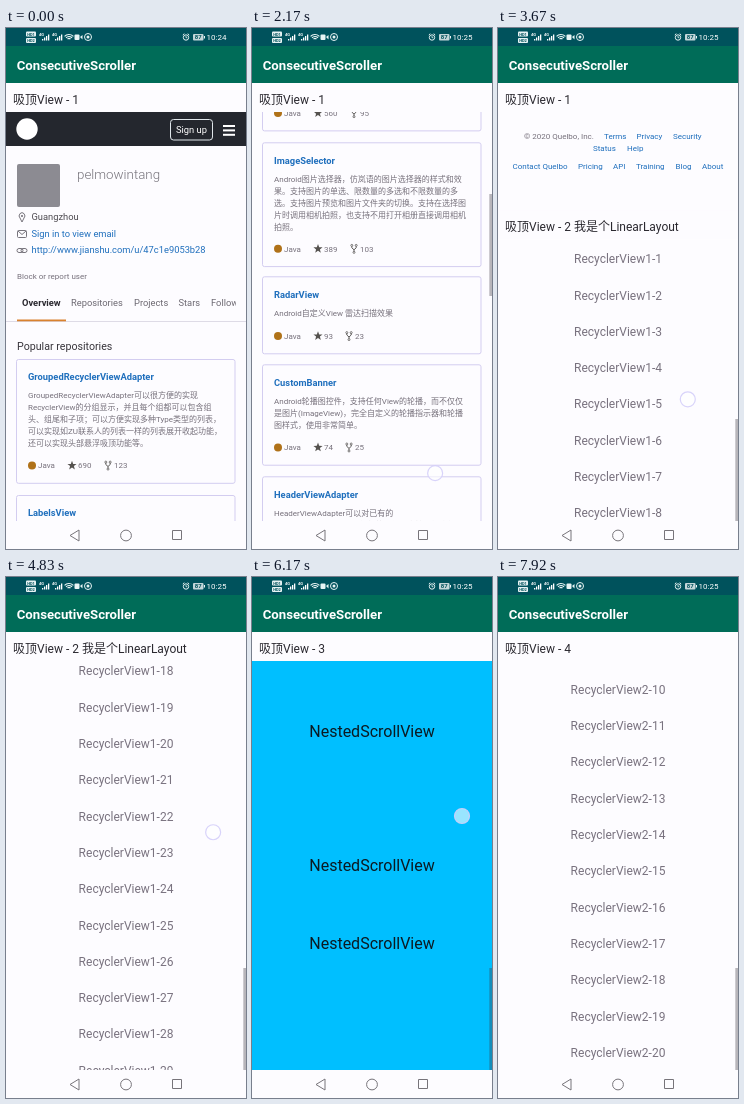
Recreate the animation shown at these times as an HTML page with a canvas. Size 240 px wide and 521 px high, loop 8 s.

```html
<!DOCTYPE html>
<html lang="zh">
<head>
<meta charset="utf-8">
<title>ConsecutiveScroller</title>
<style>
html, body { margin: 0; width: 100%; height: 100%; overflow: hidden; background: #fdfcff; }
canvas { display: block; width: 240px; height: 521px; }
</style>
</head>
<body>
<canvas id="stage"></canvas>
<script>
const W = 240, H = 521, LOOP = 8000, TOP = 55, BOTTOM = 493, BAR = 29, ROW = 36.3;
const PAPER = '#fdfcff', LINK = '#1f6fbd', GREY = '#77717c', INK = '#2b2930';
const canvas = document.getElementById('stage');
const ctx = canvas.getContext('2d');
const dpr = window.devicePixelRatio || 1;
canvas.width = W * dpr;
canvas.height = H * dpr;

// Page layout, in scroll coordinates
const heads = [
  { y: 55, label: '吸顶View - 1' },
  { y: 1743, label: '吸顶View - 2 我是个LinearLayout' },
  { y: 2861, label: '吸顶View - 3' },
  { y: 3377, label: '吸顶View - 4' }
];

const cards = [
  { y: 331, name: 'GroupedRecyclerViewAdapter', stars: 690, forks: 123, text: [
    'GroupedRecyclerViewAdapter可以很方便的实现',
    'RecyclerView的分组显示，并且每个组都可以包含组',
    '头、组尾和子项；可以方便实现多种Type类型的列表，',
    '可以实现如ZU联系人的列表一样的列表展开收起功能，',
    '还可以实现头部悬浮吸顶功能等。'] },
  { y: 467, name: 'LabelsView', stars: 560, forks: 95, text: [
    '标签列表控件，可以设置标签的选中效果。可以设置',
    '标签的选中类型：不可选中、单选、限数量多选和不',
    '限数量多选等，并支持设置必选项、单行显示、最大',
    '显示行数等功能。'] },
  { y: 591, name: 'ImageSelector', stars: 389, forks: 103, text: [
    'Android图片选择器，仿岚语的图片选择器的样式和效',
    '果。支持图片的单选、限数量的多选和不限数量的多',
    '选。支持图片预览和图片文件夹的切换。支持在选择图',
    '片时调用相机拍照，也支持不用打开相册直接调用相机',
    '拍照。'] },
  { y: 725, name: 'RadarView', stars: 93, forks: 23, text: ['Android自定义View 雷达扫描效果'] },
  { y: 813, name: 'CustomBanner', stars: 74, forks: 25, text: [
    'Android轮播图控件，支持任何View的轮播，而不仅仅',
    '是图片(ImageView)，完全自定义的轮播指示器和轮播',
    '图样式，使用非常简单。'] },
  { y: 925, name: 'HeaderViewAdapter', stars: 61, forks: 14, text: [
    'HeaderViewAdapter可以对已有的',
    'RecyclerView.Adapter进行包装，使其支持添加头部',
    '和尾部的功能。'] }
];

// Time and scroll distance
const knots = [
  [1400, 0], [1500, 62], [1680, 225], [1900, 392], [2160, 470], [2170, 476],
  [2260, 550], [2430, 695], [2640, 880], [2870, 982], [2960, 1055], [3130, 1205],
  [3330, 1400], [3574, 1482], [3670, 1560], [3834, 1700], [4060, 1930], [4320, 2075],
  [4591, 2121], [4830, 2314], [5020, 2440], [5300, 2545], [5600, 2587], [5910, 2594],
  [6170, 2806], [6350, 2917], [6588, 2962], [6830, 3157], [7000, 3270], [7255, 3355],
  [7515, 3540], [7700, 3612], [7920, 3640]
];
const swipes = [1410, 2165, 2870, 3574, 4591, 5911, 6588, 7255];
const SWIPE = 260;

const step = i => (knots[i + 1][1] - knots[i][1]) / (knots[i + 1][0] - knots[i][0]);

function slope(i) {
  if (i === 0 || i === knots.length - 1) return 0;
  const a = step(i - 1), b = step(i);
  return a * b > 0 ? 2 * a * b / (a + b) : 0;
}

function scrollAt(t) {
  const last = knots.length - 1;
  if (t <= knots[0][0]) return 0;
  if (t >= knots[last][0]) return knots[last][1];
  let i = 0;
  while (knots[i + 1][0] < t) i++;
  const [t0, a] = knots[i], [t1, b] = knots[i + 1];
  const h = t1 - t0, u = (t - t0) / h, v = 1 - u;
  return v * v * (1 + 2 * u) * a + u * v * v * h * slope(i)
    + u * u * (3 - 2 * u) * b - u * u * v * h * slope(i + 1);
}

// Drawing helpers
function text(str, x, y, size, color, weight = 400, align = 'left') {
  ctx.font = `${weight} ${size}px Roboto, "Noto Sans CJK SC", "Noto Sans CJK", sans-serif`;
  ctx.textAlign = align;
  ctx.fillStyle = color;
  ctx.fillText(str, x, y + size * 0.355);
}

function rect(x, y, w, h, color) {
  ctx.fillStyle = color;
  ctx.fillRect(x, y, w, h);
}

function box(x, y, w, h, r, stroke, fill, line = 1) {
  ctx.beginPath();
  ctx.roundRect(x, y, w, h, r);
  paint(stroke, fill, line);
}

function disc(x, y, r, stroke, fill, line = 1) {
  ctx.beginPath();
  ctx.arc(x, y, r, 0, 7);
  paint(stroke, fill, line);
}

function path(points, stroke, fill, line = 1, close = false) {
  ctx.beginPath();
  points.forEach(([x, y]) => ctx.lineTo(x, y));
  if (close) ctx.closePath();
  paint(stroke, fill, line);
}

function paint(stroke, fill, line) {
  ctx.lineWidth = line;
  if (fill) { ctx.fillStyle = fill; ctx.fill(); }
  if (stroke) { ctx.strokeStyle = stroke; ctx.stroke(); }
}

function clip(x, y, w, h, draw) {
  ctx.save();
  ctx.beginPath();
  ctx.rect(x, y, w, h);
  ctx.clip();
  draw();
  ctx.restore();
}

const visible = (y, h) => y < BOTTOM && y + h > TOP;

// Web page
function star(x, y) {
  const pts = [];
  for (let i = 0; i < 10; i++) {
    const r = i % 2 ? 2 : 4.8, a = i * Math.PI / 5 - Math.PI / 2;
    pts.push([x + r * Math.cos(a), y + r * Math.sin(a)]);
  }
  path(pts, null, '#55524f', 1, true);
}

function fork(x, y) {
  const c = '#5c5a58';
  path([[x - 2.2, y - 3], [x - 2.2, y - 1], [x, y + 1], [x, y + 3]], c, null, 1);
  path([[x + 2.2, y - 3], [x + 2.2, y - 1], [x, y + 1]], c, null, 1);
  [[-2.2, -3.4], [2.2, -3.4], [0, 3.6]].forEach(([a, b]) => disc(x + a, y + b, 1, c, PAPER, 0.8));
}

function card(c, s) {
  const y = c.y - s, h = 77 + 11.7 * (c.text.length - 1), base = y + h - 17.3;
  if (!visible(y, h)) return;
  box(10.5, y + 0.5, 218.5, h, 2, '#d3cdf0', null);
  text(c.name, 22, y + 18, 9.33, LINK, 700);
  c.text.forEach((line, i) => text(line, 22, y + 36.5 + 12 * i, 8, GREY));
  disc(26, base, 4, null, '#b07219');
  text('Java', 32, base, 8, GREY);
  star(66, base);
  text(c.stars, 72, base, 8, GREY);
  const x = c.stars > 99 ? 102 : 97;
  fork(x, base);
  text(c.forks, x + 6, base, 8, GREY);
}

function profile(s) {
  const y = v => v - s;
  rect(0, y(84), W, 34, '#24272e');
  disc(21, y(101), 10.7, null, '#fff');
  box(164.5, y(91.5), 42, 20.5, 3, '#dfe6ea', null);
  text('Sign up', 185.5, y(101.8), 9.33, '#fff', 400, 'center');
  [97, 101.4, 105.8].forEach(v => rect(217, y(v), 12, 2, '#fff'));

  box(11, y(136), 43, 43, 2, null, '#8c8b92');
  text('pelmowintang', 71, y(146), 13.33, '#77747c', 300);

  const c = '#77747c';
  path([[13, y(188)], [14, y(185.6)], [16, y(184.6)], [18, y(185.6)], [19, y(188)], [16, y(194)]], c, null, 1, true);
  disc(16, y(188), 1.1, null, c);
  box(11.5, y(202.5), 9, 7, 1, c, null);
  path([[12, y(203)], [16, y(206.5)], [20, y(203)]], c, null);
  box(11, y(220.5), 6, 4, 2, c, null);
  box(15, y(220.5), 6, 4, 2, c, null);
  text('Guangzhou', 25.5, y(189), 9.33, '#4d4a50');
  text('Sign in to view email', 25.5, y(205.5), 9.33, LINK);
  text('http://www.jianshu.com/u/47c1e9053b28', 25.5, y(222), 9.33, LINK);
  text('Block or report user', 11, y(248.5), 8, GREY);

  rect(0, y(293), W, 1, '#dedbe6');
  clip(0, y(262), 230, 40, () => {
    text('Overview', 16, y(274.5), 9.33, INK, 700);
    [['Repositories', 65], ['Projects', 128], ['Stars', 172.5], ['Followers', 205]]
      .forEach(([label, x]) => text(label, x, y(274.5), 9.33, '#6d6972'));
  });
  rect(11, y(291.5), 49, 1.8, '#d9822f');
  text('Popular repositories', 11, y(318), 10.67, '#38353c');
}

function activity(s) {
  const y = v => v - s;
  text('186 contributions in the last year', 11, y(1056), 10.67, '#38353c');
  box(10.5, y(1072.5), 218.5, 92, 2, '#d3cdf0', null);
  for (let i = 0; i < 23; i++) {
    for (let j = 0; j < 7; j++) {
      const hot = Math.sin(i * 12.9 + j * 78.2) > 0.72;
      rect(19 + i * 9, y(1088 + j * 9), 7, 7, hot ? '#9bd58b' : '#ebedf0');
    }
  }
  text('Contribution activity', 11, y(1198), 10.67, '#38353c');
  ['April 2020', 'March 2020', 'February 2020'].forEach((m, i) => {
    const top = 1228 + i * 108;
    text(m, 11, y(top), 8, '#4d4a50', 700);
    rect(75, y(top), 154, 1, '#e1e0ea');
    rect(20, y(top + 14), 1.4, 74, '#e1e0ea');
    disc(20.7, y(top + 36), 8, null, '#e4e5ec');
    text('Created commits in 2 repositories', 36, y(top + 36), 9.33, '#4d4a50');
    text('ConsecutiveScroller', 36, y(top + 56), 8, LINK);
    text('LabelsView', 36, y(top + 72), 8, LINK);
  });
  box(10.5, y(1566.5), 218.5, 24, 2, '#d3cdf0', null);
  text('Show more activity', 120, y(1578.5), 8, LINK, 700, 'center');
  rect(11, y(1638), 218, 1, '#e1e0ea');
}

function footer(s) {
  const y = v => v - s;
  text('© 2020 Quelbo, Inc.', 26, y(1669.2), 8, GREY);
  [['Terms', 106, 1669.2], ['Privacy', 138.5, 1669.2], ['Security', 175, 1669.2],
   ['Status', 95, 1681.2], ['Help', 129, 1681.2],
   ['Contact Quelbo', 14.5, 1698.6], ['Pricing', 80, 1698.6], ['API', 115, 1698.6],
   ['Training', 138, 1698.6], ['Blog', 177.5, 1698.6], ['About', 204, 1698.6]]
    .forEach(([label, x, v]) => text(label, x, y(v), 8, LINK));
}

// Native views
function list(prefix, top, count) {
  for (let i = 0; i < count; i++) {
    const y = top + i * ROW;
    if (visible(y, ROW)) text(prefix + (i + 1), 120, y + ROW / 2 + 1.7, 12, '#79727f', 400, 'center');
  }
}

function nested(s) {
  const y = 2890 - s;
  if (!visible(y, 487)) return;
  rect(0, y, W, 487, '#00bfff');
  [71, 205, 283, 422].forEach(v => text('NestedScrollView', 120, y + v, 16, '#0b1a22', 400, 'center'));
}

function headers(s) {
  heads.forEach((h, i) => {
    let y = Math.max(TOP, h.y - s);
    if (i < 3) y = Math.min(y, heads[i + 1].y - s - BAR);
    if (!visible(y, BAR)) return;
    rect(0, y, W, BAR, PAPER);
    text(h.label, 7, y + 16.3, 12, INK);
  });
}

function touch(t) {
  const start = swipes.find(v => t >= v - 15 && t <= v + SWIPE + 30);
  if (start === undefined) return;
  const p = Math.min(1, Math.max(0, (t - start) / SWIPE));
  disc(183 + 27 * p ** 1.4, 450 - 211 * p, 7.5, 'rgba(212,206,250,.9)', 'rgba(255,255,255,.6)', 1.2);
}

// System chrome
function signal(x) {
  text('4G', x, 6.5, 4, '#fff', 700);
  for (let i = 0; i < 4; i++) rect(x + 3 + i * 2, 11 - i * 1.5, 1.3, 1.5 + i * 1.5, '#fff');
}

function statusBar(t) {
  const c = '#e8f4f4', dark = '#00525c';
  rect(0, 0, W, 18, dark);
  [3.5, 10].forEach((y, i) => {
    box(20, y, 10, 5, 1, null, c);
    text('HD' + (i + 1), 25, y + 2.6, 4, dark, 700, 'center');
  });
  signal(33);
  signal(46);
  [2, 4, 6].forEach(r => {
    ctx.beginPath();
    ctx.arc(63, 12.5, r, -2.4, -0.74);
    paint(c, null, 1.2);
  });
  box(68.5, 6.5, 5, 5.5, 1, null, c);
  path([[74, 9], [76.5, 7], [76.5, 11.5]], null, c, 1, true);
  disc(82, 9, 3.5, c, null, 1);
  disc(82, 9, 1.5, null, c);

  disc(180, 9.5, 2.7, c, null, 1);
  path([[180, 8], [180, 9.7], [181.3, 9.7]], c, null, 0.8);
  path([[176.8, 7], [178.3, 5.7]], c, null, 1);
  path([[181.7, 5.7], [183.2, 7]], c, null, 1);
  box(187, 6, 10.5, 6.5, 1, null, '#c3d6d9');
  rect(198, 8, 1, 2.5, c);
  text('87', 192.2, 9.3, 6, dark, 700, 'center');
  text(t < 540 ? '10:24' : '10:25', 200.5, 9, 8, '#fff');
}

function chrome(t) {
  statusBar(t);
  rect(0, 18, W, TOP - 18, '#006c58');
  text('ConsecutiveScroller', 10.7, 37.5, 13.2, '#fff', 700);
  rect(0, BOTTOM, W, H - BOTTOM, PAPER);
  const c = '#77747a';
  path([[64, 507.5], [73, 502], [73, 513]], c, null, 1, true);
  disc(120, 507.5, 5.4, c, null);
  box(166.5, 502.5, 9, 9, 0, c, null);
}

function draw(t) {
  const s = scrollAt(t);
  ctx.setTransform(dpr, 0, 0, dpr, 0, 0);
  rect(0, 0, W, H, PAPER);
  clip(0, TOP, W, BOTTOM - TOP, () => {
    if (s < 1688) {
      if (s < 300) profile(s);
      cards.forEach(c => card(c, s));
      if (s > 500) activity(s);
      footer(s);
    }
    list('RecyclerView1-', 1772 - s, 30);
    nested(s);
    list('RecyclerView2-', 3406 - s, 20);
    headers(s);
    if (s > 0) rect(237.33, TOP + 336 * Math.min(1, s / 1443), 2.67, 102, 'rgba(60,56,64,.36)');
  });
  chrome(t);
  touch(t);
}

function frame() {
  draw(performance.now() % LOOP);
  requestAnimationFrame(frame);
}
frame();
</script>
</body>
</html>
```
